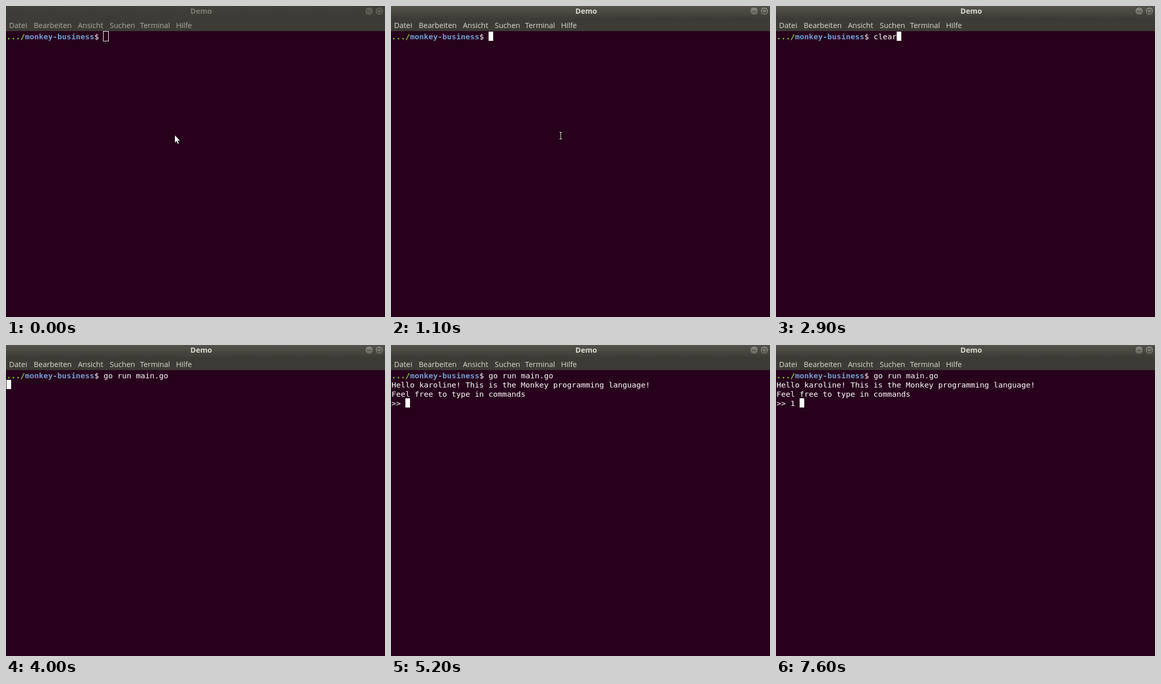
Recreate the animation shown at these times as an HTML page. Size 738 by 607 pixels, loop 8 s.

```html
<!DOCTYPE html>
<html lang="de">
<head>
<meta charset="utf-8">
<title>Demo</title>
<style>
html, body { margin: 0; width: 100%; height: 100%; overflow: hidden; background: #27011c; }
.stage { position: relative; width: 738px; height: 607px; overflow: hidden; contain: strict; }
.stage * {
  animation-duration: 8s;
  animation-timing-function: step-end;
  animation-iteration-count: infinite;
}
.bar {
  position: absolute; left: 0; top: 0; width: 738px; height: 49px;
  font: 14.4px/19px "Open Sans", "Noto Sans", sans-serif;
  background: linear-gradient(#55534b, #3c3b36 25px);
  color: #dfdbd2;
}
.dim {
  position: absolute; inset: 0;
  background: linear-gradient(#403f39, #3c3b36 25px);
  animation-name: blurred;
}
.bar b, .bar span { position: absolute; white-space: pre; }
.bar b { left: 359px; top: 0; animation-name: title; }
.menu { animation-name: menu; }
.menu span { top: 28px; }

.term {
  position: absolute; left: 1px; top: 51px;
  font: 14.95px/18px "DejaVu Sans Mono", monospace;
  color: #fff; white-space: pre;
}
.term div { position: absolute; left: 0; top: 0; }
.dir { color: #8ae234; }
.name { color: #729fcf; }
.term .clear { left: 189px; animation-name: clear; }
.term .run { left: 189px; animation-name: run; }
.term .out { top: 18px; animation-name: out; }
.term .one { left: 27px; top: 54px; animation-name: one; }
.term .cursor {
  width: 9px; height: 18px; margin-top: -1px;
  animation-name: move, blink, focus;
}
.icons { position: absolute; left: 0; top: 0; }
.off { animation-name: blurred; }
.arrow { animation-name: arrow; }
.beam { animation-name: beam; }

@keyframes blurred { 0% { opacity: 1 } 13.75%, 100% { opacity: 0 } }
@keyframes title { 0% { color: #807d76 } 13.75%, 100% { color: #dfdbd2 } }
@keyframes menu { 0% { color: #b0ada5 } 13.75%, 100% { color: #dfdbd2 } }
@keyframes arrow { 0% { opacity: 1 } 1.25%, 100% { opacity: 0 } }
@keyframes beam { 0%, 36.25%, 100% { opacity: 0 } 1.25% { opacity: 1 } }
@keyframes clear { 0%, 41.25%, 100% { opacity: 0 } 36.25% { opacity: 1 } }
@keyframes run { 0% { opacity: 0 } 41.25%, 100% { opacity: 1 } }
@keyframes out { 0% { opacity: 0 } 53.75%, 100% { opacity: 1 } }
@keyframes one { 0% { opacity: 0 } 91.25%, 100% { opacity: 1 } }
@keyframes focus {
  0% { background: transparent; box-shadow: 0 0 0 1px #fff }
  13.75%, 100% { background: #fff; box-shadow: none }
}
@keyframes blink {
  0%, 28.75%, 36.25%, 50%, 65%, 78.75%, 91.25%, 100% { opacity: 1 }
  20%, 35%, 48.75%, 57.5%, 71.25%, 86.25% { opacity: 0 }
}
@keyframes move {
  0% { left: 189px; top: 0 }
  36.25% { left: 234px; top: 0 }
  41.25% { left: 324px; top: 0 }
  50% { left: 0; top: 18px }
  53.75% { left: 27px; top: 54px }
  91.25% { left: 36px; top: 54px }
  95%, 100% { left: 45px; top: 54px }
}
</style>
</head>
<body>
<div class="stage">
<div class="bar">
  <div class="dim"></div>
  <b>Demo</b>
  <div class="menu">
    <span style="left:6px">Datei</span>
    <span style="left:54px">Bearbeiten</span>
    <span style="left:140px">Ansicht</span>
    <span style="left:202px">Suchen</span>
    <span style="left:261px">Terminal</span>
    <span style="left:331px">Hilfe</span>
  </div>
</div>

<div class="term"><div><b class="dir">.../</b><b class="name">monkey-business</b>$ </div><div class="clear">clear</div><div class="run">go run main.go</div><div class="out">Hello karoline! This is the Monkey programming language!
Feel free to type in commands
&gt;&gt; </div><div class="one">1</div><div class="cursor"></div></div>

<svg class="icons" width="738" height="607">
  <defs>
    <linearGradient id="knob" x2="0" y2="1">
      <stop stop-color="#8c8a80"/><stop offset="1" stop-color="#66645b"/>
    </linearGradient>
    <g id="buttons">
      <circle cx="707" cy="10" r="8"/>
      <circle cx="727" cy="10" r="8"/>
      <path d="M703 10.5h8M723.5 6.5h7v7h-7z" fill="none"/>
    </g>
  </defs>
  <use href="#buttons" fill="url(#knob)" stroke="#383732"/>
  <use class="off" href="#buttons" fill="#5d5b54" stroke="#3a3934"/>
  <path class="arrow" d="M328.5 251.5v16l3.6-3.3 2.4 5.3 2.6-1.2-2.4-5.1h4.6z" fill="#fff" stroke="#111" stroke-width=".9"/>
  <g class="beam" fill="none">
    <path d="M327.5 246.5h6M327.5 259.5h6M330.5 246v14" stroke="#111" stroke-width="2.4"/>
    <path d="M328 246.5h5M328 259.5h5M330.5 246v14" stroke="#e4ece4"/>
  </g>
</svg>
</div>
</body>
</html>
```
